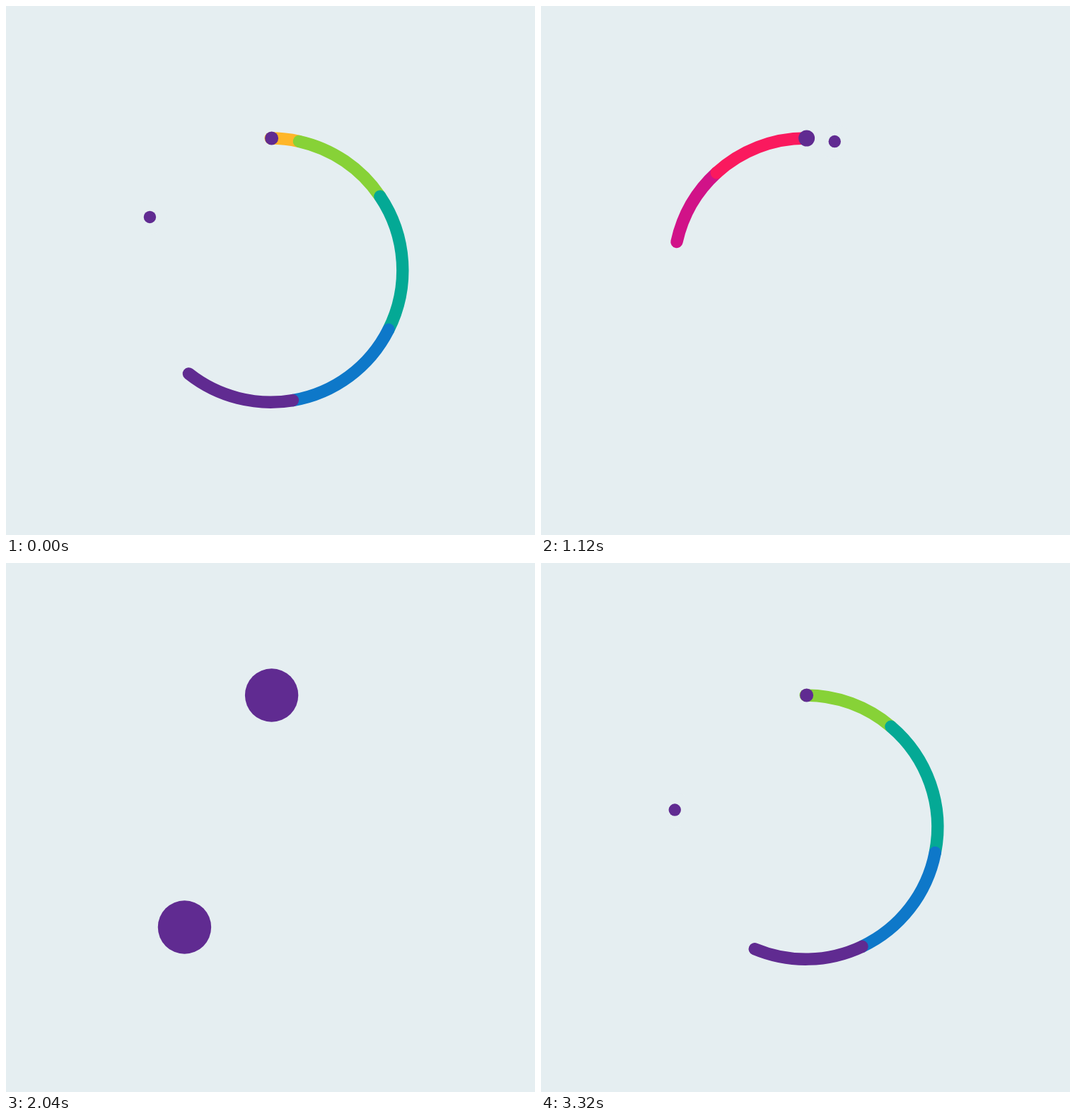
An HTML page with a canvas for the animation above (3.36 s loop, 748x748 px).

```html
<!DOCTYPE html>
<html lang="en">
<head>
<meta charset="utf-8">
<title>Rainbow orbit</title>
<style>
html, body { margin: 0; width: 100%; height: 100%; overflow: hidden; background: #e5eef1; }
canvas { display: block; width: 748px; height: 748px; }
</style>
</head>
<body>
<canvas id="stage" width="748" height="748"></canvas>
<script>
const ctx = document.getElementById('stage').getContext('2d');
const LOOP = 3360, STEP = 40, RELEASE = 2802;
const CX = 374.2, CY = 373.6, R = 186.6;
const BG = '#e5eef1', PURPLE = '#602b91';
const BIG = 37.7, SMALL = 8.7, HUB = 9.5, HALO = 24.5;

// Trail colours from head to tail, and their borders in degrees behind the head
const COLORS = [PURPLE, '#0e78c9', '#04a995', '#87d237', '#ffb629', '#ff5429', '#fa195e', '#d11288'];
const EDGES = [0, 48, 101.6, 162.4, 205.9, 249.8, 296.5, 339, 374.2];
const TRAIL_SPEED = 360 / 920;

const clamp = (v, lo, hi) => Math.min(hi, Math.max(lo, v));
const rad = deg => (deg - 90) * Math.PI / 180;
const mix = (a, b, k) => a + (b - a) * k;

function smooth(t, from, to) {
  const u = clamp((t - from) / (to - from), 0, 1);
  return u * u * (3 - 2 * u);
}

function disc(x, y, r, color) {
  ctx.fillStyle = color;
  ctx.beginPath();
  ctx.arc(x, y, r, 0, Math.PI * 2);
  ctx.fill();
}

// Two quick turns after the release, then one slow turn that eases out
function orbitAngle(t) {
  const slow = 1622.5;
  if (t < slow) return 0.4 * t + 71 * (1 - Math.exp(-t / 110));
  const s = t - slow;
  return 720 + 0.229 * s - 37.9 * Math.pow(s / (LOOP - slow), 4.6);
}

function drawTrail(t) {
  const head = t * TRAIL_SPEED;
  ctx.lineWidth = 17.4;
  ctx.lineCap = 'round';
  for (let i = COLORS.length - 1; i >= 0; i--) {
    const a = clamp(head - EDGES[i + 1], 0, 360);
    const b = clamp(head - EDGES[i], 0, 360);
    if (b <= a) continue;
    ctx.strokeStyle = COLORS[i];
    ctx.beginPath();
    ctx.arc(CX, CY, R, rad(a), rad(b));
    ctx.stroke();
  }
}

function draw(time) {
  const t = (time - RELEASE + LOOP) % LOOP;
  ctx.fillStyle = BG;
  ctx.fillRect(0, 0, 748, 748);
  drawTrail(t);

  const a = rad(orbitAngle(t));
  const x = CX + R * Math.cos(a), y = CY + R * Math.sin(a);
  disc(x, y, HALO, BG);
  disc(x, y, mix(SMALL, BIG, smooth(t, 1718, 2198)), PURPLE);

  const hub = t < 1000 ? 1 - smooth(t, 0, 360) : smooth(t, 1613, 2013);
  disc(375.6, 187, mix(HUB, BIG, hub), PURPLE);
}

const start = performance.now();
function tick() {
  const time = (performance.now() - start) % LOOP;
  draw(Math.floor(time / STEP) * STEP);
  requestAnimationFrame(tick);
}
tick();
</script>
</body>
</html>
```
